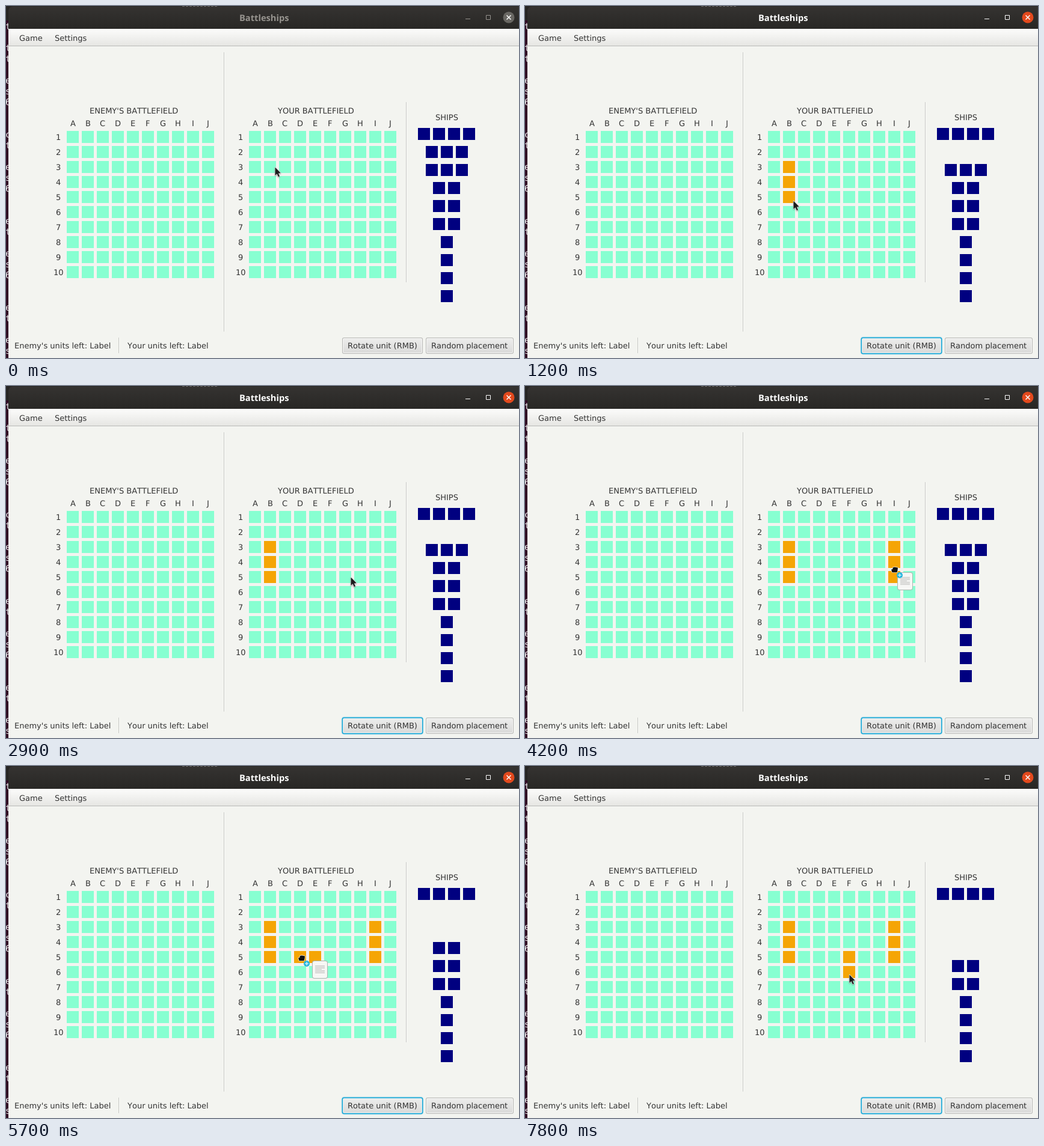
Recreate the animation shown at these times as an HTML page with a canvas. Size 853 by 586 pixels, loop 8 s.

```html
<!DOCTYPE html>
<html lang="en">
<head>
<meta charset="utf-8">
<title>Battleships</title>
<style>
html, body { margin: 0; width: 100%; height: 100%; overflow: hidden; background: #f3f4f0; }
canvas { display: block; }
</style>
</head>
<body>
<canvas id="stage" width="853" height="586"></canvas>
<script>
const W = 853, H = 586, LOOP = 8000, STEP = 100, FOCUS_AT = 500;
const SETTLE = 200, SWING = 300;
const ctx = document.getElementById('stage').getContext('2d');
const UI = '13px "DejaVu Sans", Verdana, sans-serif';
const CAPTION = 'bold 14.67px "Noto Sans", "Open Sans", sans-serif';
const TERM = '15px "DejaVu Sans Mono", monospace';
const PAGE = '#f3f4f0', MINT = '#87ffd1', ORANGE = '#f5a505', NAVY = '#000080', INK = '#333333';
const CELL = 20, PITCH = 25, TOP = 208, ENEMY_X = 101, OWN_X = 404;
const FLEET = [4, 3, 3, 2, 2, 2, 1, 1, 1, 1];

const at = (x, y) => ({ x, y });
const HOME = at(447, 268);

// press at a, pull to b by stop, let go at drop, then swing past via to the next press
const DRAGS = [
  { press: 500, stop: 900, drop: 1100, a: at(439, 268), b: at(438, 325), via: at(510, 316), down: true, ship: 1 },
  { press: 2200, stop: 2500, drop: 2900, a: at(491, 314), b: at(573, 318), via: at(607, 274) },
  { press: 4000, stop: 4400, drop: 4800, a: at(608, 271), b: at(616, 318), via: at(550, 319), down: true, ship: 2 },
  { press: 5600, stop: 5900, drop: 6500, a: at(489, 320), b: at(548, 318), via: at(549, 318) },
  { press: 7300, stop: 7500, drop: 7800, a: at(540, 320), b: at(539, 347), down: true, ship: 3 }
];

const easeIn = k => k * k, easeInHard = k => k ** 3, easeOut = k => 1 - (1 - k) ** 2;

function glide(p, q, t, t0, t1, ease) {
  const k = ease(Math.min(1, Math.max(0, (t - t0) / (t1 - t0))));
  return at(Math.round(p.x + (q.x - p.x) * k), Math.round(p.y + (q.y - p.y) * k));
}

function pointerAt(t) {
  const next = DRAGS.findIndex(d => t < d.press);
  const last = DRAGS[next < 0 ? DRAGS.length - 1 : next - 1];
  if (!last) return glide(HOME, DRAGS[0].a, t, 0, DRAGS[0].press - SETTLE, easeOut);
  if (t < last.drop || next < 0)
    return glide(last.a, last.b, t, last.press, last.stop, last.down ? easeOut : easeInHard);
  const turn = last.drop + SWING, to = DRAGS[next];
  return t < turn
    ? glide(last.b, last.via, t, last.drop, turn, easeIn)
    : glide(last.via, to.a, t, turn, to.press - SETTLE, easeOut);
}

// the carried sheet runs one step ahead of the hand sideways
const carriedAt = (t, d) => at(pointerAt(Math.min(t + STEP, d.drop - 1)).x, pointerAt(t).y);

function rect(x, y, w, h, fill) {
  ctx.fillStyle = fill;
  ctx.fillRect(x, y, w, h);
}

function roundRect(x, y, w, h, r, fill) {
  ctx.beginPath();
  ctx.roundRect(x, y, w, h, r);
  ctx.fillStyle = fill;
  ctx.fill();
}

function disc(x, y, r, fill) {
  ctx.beginPath();
  ctx.arc(x, y, r, 0, 7);
  ctx.fillStyle = fill;
  ctx.fill();
}

function text(s, x, y, centred, fill = INK, font = UI) {
  ctx.font = font;
  ctx.fontKerning = 'none';
  ctx.textRendering = 'geometricPrecision';
  ctx.fillStyle = fill;
  if (centred) x = Math.round(x - ctx.measureText(s).width / 2);
  ctx.fillText(s, x, y);
}

function shade(y0, y1, a, b) {
  const g = ctx.createLinearGradient(0, y0, 0, y1);
  g.addColorStop(0, a);
  g.addColorStop(1, b);
  return g;
}

function poly(x, y, points, fill, edge, width) {
  ctx.beginPath();
  points.forEach(([px, py]) => ctx.lineTo(x + px, y + py));
  ctx.closePath();
  ctx.lineJoin = 'round';
  ctx.lineWidth = width;
  ctx.strokeStyle = edge;
  ctx.stroke();
  ctx.fillStyle = fill;
  ctx.fill();
}

function backdrop() {
  rect(0, 0, W, H, '#300a24');
  rect(0, 0, W, 24, '#262523');
  for (let x = 293; x < 350; x += 6) rect(x, 0, 4, 1, '#6b6966');
  [...'t tt es6  ct es6  et es6  et es'].forEach((c, i) => text(c, -1, 39 + 18 * i, false, '#e6e6e6', TERM));
}

function titleBar(active) {
  roundRect(4, 1, W, 60, [7, 0, 0, 0], shade(1, 38, '#353331', '#282725'));
  const ink = active ? '#ffffff' : '#96938e';
  text('Battleships', 429, 25, true, ink, CAPTION);
  rect(764, 21, 8, 1, ink);
  ctx.strokeStyle = ink;
  ctx.lineWidth = 1;
  ctx.strokeRect(798.5, 15.5, 7, 7);
  disc(836, 19, 9.5, active ? '#e2491d' : '#696763');
  ctx.beginPath();
  for (const d of [-1, 1]) {
    ctx.moveTo(832.5, 19 - 3.5 * d);
    ctx.lineTo(839.5, 19 + 3.5 * d);
  }
  ctx.strokeStyle = '#ffffff';
  ctx.lineWidth = 1.5;
  ctx.stroke();
}

function separator(x, y0, y1) {
  rect(x, y0, 1, y1 - y0, '#c6c7c4');
  rect(x + 1, y0, 1, y1 - y0, '#fafaf8');
}

function button(label, x, w, focused) {
  const y = 552, h = 27;
  const layer = (inset, fill) =>
    roundRect(x + inset, y + inset, w - 2 * inset, h - 2 * inset, Math.max(1, 3 - inset), fill);
  if (focused) {
    layer(-1.4, 'rgba(3,158,211,.3)');
    layer(-0.2, '#039ed3');
  } else {
    layer(0, '#b5b5b3');
  }
  layer(1, focused ? '#dfeef2' : '#f8f8f7');
  layer(2, shade(y, y + h, '#eeeeed', '#d9d9d8'));
  text(label, x + w / 2, 570, true);
}

function square(x, y, fill) {
  rect(x, y, CELL, CELL, fill);
}

function board(x, title) {
  text(title, x + 111.5, 179, true);
  for (let i = 0; i < 10; i++) {
    text('ABCDEFGHIJ'[i], x + 10 + PITCH * i, 200, true);
    text(String(i + 1), x - 14, 223 + PITCH * i, true);
    for (let j = 0; j < 10; j++) square(x + PITCH * i, TOP + PITCH * j, MINT);
  }
}

const cellOf = (pos, origin) => Math.floor((pos - origin + 2.5) / PITCH);

function paintDrag(d, t) {
  const p = carriedAt(t, d);
  const col = cellOf(d.a.x, OWN_X), row = cellOf(d.a.y, TOP);
  const reach = d.down ? cellOf(p.y, TOP) - row : cellOf(p.x, OWN_X) - col;
  for (let i = 0; i <= reach; i++)
    square(OWN_X + PITCH * (col + (d.down ? 0 : i)), TOP + PITCH * (row + (d.down ? i : 0)), ORANGE);
}

function fleet(t) {
  text('SHIPS', 733, 190, true);
  FLEET.forEach((n, i) => {
    if (DRAGS.some(d => d.ship === i && t >= d.drop)) return;
    const x = Math.floor(733 - (PITCH * n - 5) / 2);
    for (let k = 0; k < n; k++) square(x + PITCH * k, 203 + 30 * i, NAVY);
  });
}

function arrow(p) {
  const shape = [[0, 0], [0, 13.5], [3.1, 10.7], [5.4, 15.8], [7.5, 14.9], [5.3, 9.9], [9.2, 9.5]];
  ctx.save();
  ctx.shadowColor = 'rgba(0,0,0,.25)';
  ctx.shadowBlur = 2;
  ctx.shadowOffsetY = 1;
  poly(p.x + 0.5, p.y + 0.5, shape, '#ffffff', '#ffffff', 1.4);
  ctx.restore();
  poly(p.x + 0.5, p.y + 0.5, shape, '#1c1c1c', '#1c1c1c', 0.1);
}

function sheet(p) {
  const x = p.x + 3, y = p.y + 4;
  roundRect(x, y, 26, 30, 4, '#a7b5ae');
  roundRect(x + 1, y + 1, 24, 28, 3, '#f7f7f5');
  for (let i = 0; i < 7; i++) rect(x + 5, y + 8 + 2 * i, i % 4 === 3 ? 11 : 16, 1, '#c3c3c1');
}

function hand(p) {
  const shape = [[-5, -0.5], [-2.7, -1], [-2.2, -4], [1, -4.6], [6, -3.4], [5.5, 1], [4.5, 4.2], [-3.5, 4.2]];
  poly(p.x, p.y, shape, '#111111', 'rgba(255,255,255,.75)', 1.6);
  const x = p.x + 9, y = p.y + 9;
  disc(x, y, 5, '#25b5dc');
  rect(x - 3, y - 0.5, 6, 1, '#ffffff');
  rect(x - 0.5, y - 3, 1, 6, '#ffffff');
}

function draw(t) {
  const active = t >= FOCUS_AT;
  const held = DRAGS.find(d => t >= d.press && t < d.drop);
  backdrop();
  titleBar(active);
  rect(4, 38, W, H, PAGE);
  rect(4, 38, W, 28, shade(38, 66, '#fcfcfb', '#e6e6e3'));
  rect(4, 66, W, 1, '#b9bab7');
  text('Game', 22, 58);
  text('Settings', 81, 58);
  separator(362, 77, 542);
  separator(665, 160, 460);
  separator(187, 552, 578);
  board(ENEMY_X, "ENEMY'S BATTLEFIELD");
  board(OWN_X, 'YOUR BATTLEFIELD');
  for (const d of DRAGS) {
    if (d === held) paintDrag(d, t);
    else if (d.ship && t >= d.drop) paintDrag(d, d.stop);
  }
  fleet(t);
  text("Enemy's units left: Label", 14, 570);
  text('Your units left: Label', 202, 570);
  button('Rotate unit (RMB)', 559, 134, active);
  button('Random placement', 698, 146, false);
  if (held) {
    sheet(carriedAt(t, held));
    hand(pointerAt(t));
  } else {
    arrow(pointerAt(t));
  }
}

const start = performance.now();
function tick() {
  const t = (performance.now() - start) % LOOP;
  draw(Math.floor(t / STEP) * STEP);
  requestAnimationFrame(tick);
}
tick();
</script>
</body>
</html>
```
